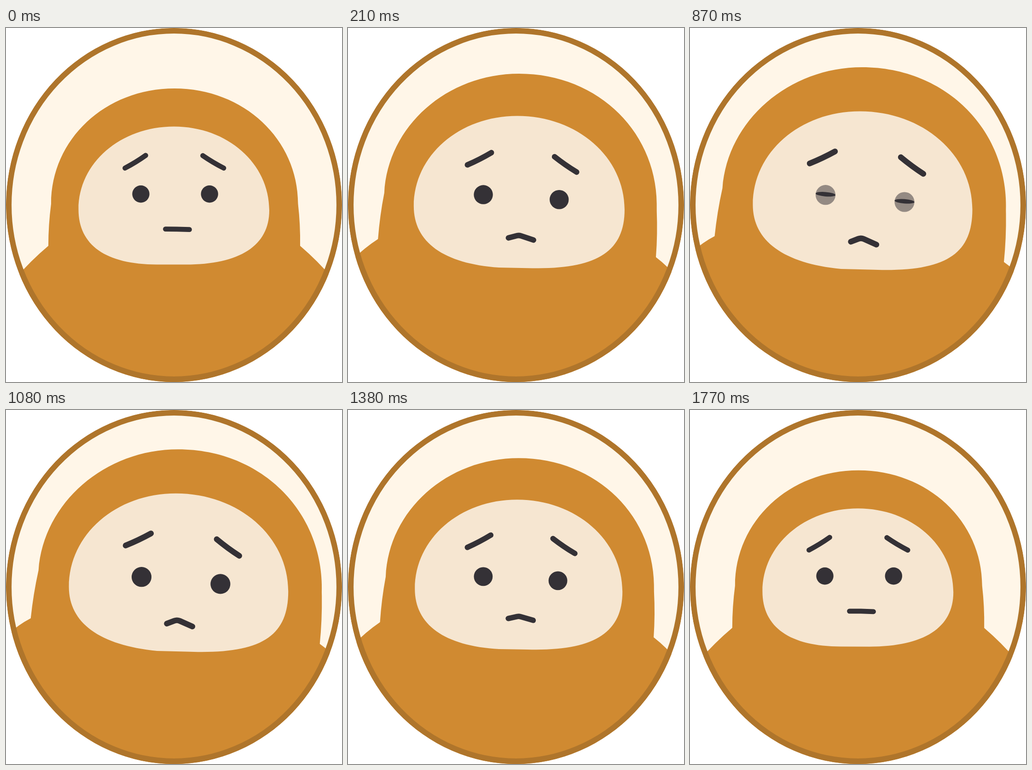
Recreate the animation shown at these times as an HTML page with a canvas. Size 730 by 767 pixels, loop 1800 ms.

```html
<!DOCTYPE html>
<html lang="en">
<head>
<meta charset="utf-8">
<title>Worried face</title>
<style>
html, body { margin: 0; width: 100%; height: 100%; overflow: hidden; background: #fff; }
canvas { display: block; }
</style>
</head>
<body>
<canvas id="stage" width="730" height="767"></canvas>
<script>
const ctx = document.getElementById('stage').getContext('2d');
const W = 730, H = 767, LOOP = 1800, STEP = 30;
const CREAM = '#fff6e8', FUR = '#d08a31', RING = '#af752b', SKIN = '#f6e6d1', INK = '#343136';
const ROUND = 0.56; // handle length that makes a quarter ellipse

let worry = 0; // 0 calm, 1 worried

const mix = (a, b, k) => a + (b - a) * k;
const between = (a, b, k) => [mix(a[0], b[0], k), mix(a[1], b[1], k)];

// A key point of the calm pose and how far it moves when worried.
const at = (x, y, dx, dy) => [x + dx * worry, y + dy * worry];

function worryAt(t) {
  if (t < 450) return 1 - Math.pow(1 - t / 450, 1.9);
  const u = Math.max(0, (t - 1045) / (LOOP - 1045));
  return 1 - u * u * (3 - 2 * u);
}

function eyeOpacity(t) {
  if (t < 870 || t >= 960) return 1;
  return t >= 900 && t < 930 ? 0 : 0.5;
}

function begin(point) {
  ctx.beginPath();
  ctx.moveTo(...point);
}

// Curve that leaves and arrives heading for the corner.
function quarter(from, corner, to, round = ROUND) {
  ctx.bezierCurveTo(...between(from, corner, round), ...between(to, corner, round), ...to);
}

// Nearly straight line, bulging to the left of its direction.
function bow(from, to, bulge) {
  const dx = to[0] - from[0], dy = to[1] - from[1];
  const k = bulge / Math.hypot(dx, dy);
  const [x, y] = between(from, to, 0.5);
  ctx.quadraticCurveTo(x + dy * k, y - dx * k, ...to);
}

function oval(x, y, rx, ry, tilt = 0) {
  ctx.beginPath();
  ctx.ellipse(x, y, rx, ry, tilt, 0, Math.PI * 2);
}

function fill(color) {
  ctx.fillStyle = color;
  ctx.fill();
}

function stroke(color, width) {
  ctx.strokeStyle = color;
  ctx.lineWidth = width;
  ctx.stroke();
}

function drawHood() {
  const shoulderL = at(20, 543, -15, -58), shoulderR = at(710, 543, 10, 0);
  const neckL = at(92, 472, -38.5, -21), neckR = at(639, 472, 43, 35);
  const templeL = at(98, 381, -27.5, -34), templeR = at(634.5, 381, 52, 22);
  const top = at(366, 131, 8, -46);

  begin(shoulderL);
  bow(shoulderL, neckL, 4);
  bow(neckL, templeL, 3);
  quarter(templeL, at(98, 131, -8, -46), top);
  quarter(top, at(634.5, 131, 68.5, -46), templeR);
  bow(templeR, neckR, 3);
  bow(neckR, shoulderR, 4);
  ctx.lineTo(W, H);
  ctx.lineTo(0, H);
  fill(FUR);
}

function drawFace() {
  const top = at(365, 213.5, 4, -33);
  const left = at(157.5, 393, -21, -10), right = at(572, 395, 41.5, -2);
  const chinL = at(328, 512.4, 0, 9.6), chinR = at(390, 512.6, 0, 10.9);

  begin(top);
  quarter(top, [left[0], top[1]], left);
  quarter(left, at(157.5, 512.4, -21, -9), chinL, 0.65);
  ctx.lineTo(...chinR);
  quarter(chinR, at(572, 512.6, 41.5, 20.4), right, mix(0.65, 0.72, worry));
  quarter(right, [right[0], top[1]], top);
  fill(SKIN);
}

function drawBrow(from, to) {
  begin(from);
  bow(from, to, -1.8);
  stroke(INK, mix(10.8, 12.4, worry));
}

function drawMouth() {
  const end = at(398.5, 436.7, 6.5, 32.6);
  begin(at(346.5, 435.7, 3, 27.3));
  ctx.arcTo(...at(371, 435.8, 0.6, 18.7), ...end, 16);
  ctx.lineTo(...end);
  stroke(INK, mix(10.8, 12.4, worry));
}

function drawEye([x, y], open) {
  const r = mix(18.7, 21.6, worry);
  ctx.globalAlpha = open;
  oval(x, y, r, r);
  fill(INK);
  ctx.globalAlpha = 1;
  if (open < 1) {
    oval(x, y - 1.5, r, 4.8, 0.08);
    fill(INK);
  }
}

function draw(t) {
  worry = worryAt(t);
  const open = eyeOpacity(t);
  ctx.clearRect(0, 0, W, H);
  ctx.save();
  oval(W / 2, H / 2, W / 2, H / 2);
  ctx.clip();
  fill(CREAM);

  drawHood();
  drawFace();
  ctx.lineCap = ctx.lineJoin = 'round';
  drawBrow(at(258.5, 303.5, 1.5, -10), at(303.5, 276, 11.5, -8.5));
  drawBrow(at(427.5, 276.5, 30.5, 3.5), at(473, 303.5, 34, 12.5));
  drawMouth();
  drawEye(at(293, 359.7, 1.5, 2), open);
  drawEye(at(442.2, 359.7, 23.8, 17.3), open);

  oval(W / 2, H / 2, W / 2 - 6, H / 2 - 6);
  stroke(RING, 12.2);
  ctx.restore();
}

const start = performance.now();
function tick() {
  const t = (performance.now() - start) % LOOP;
  draw(Math.floor(t / STEP) * STEP);
  requestAnimationFrame(tick);
}
tick();
</script>
</body>
</html>
```
